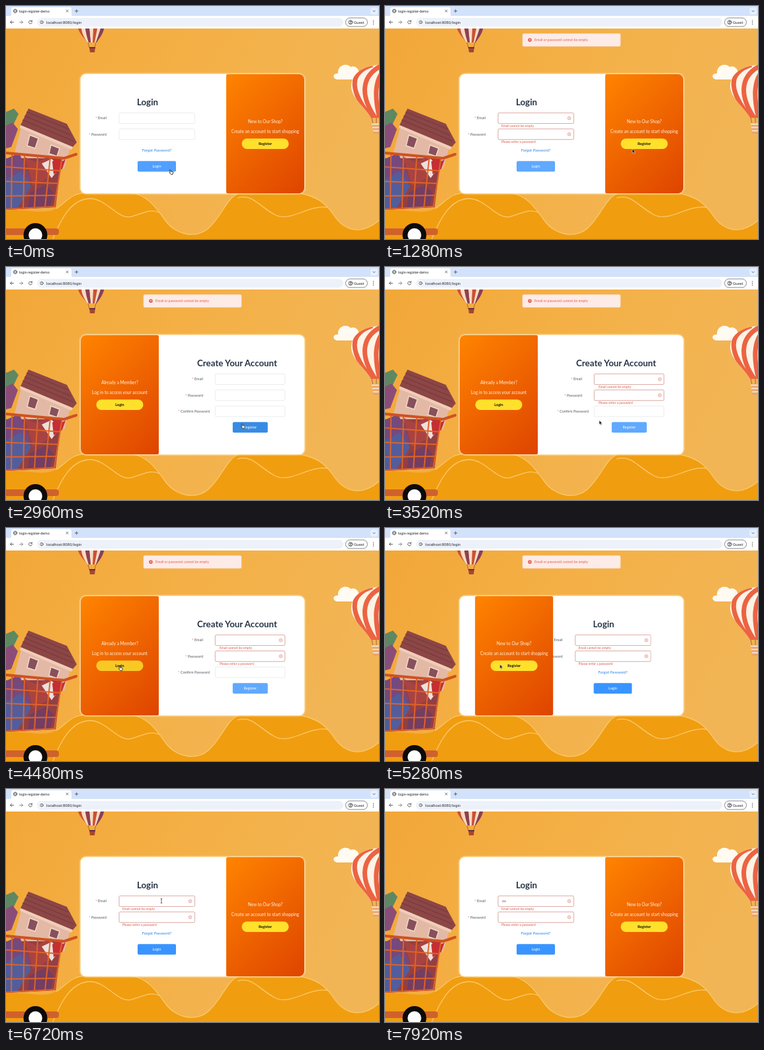
Write an HTML page that moves like this. It is 564x352 px and loops after 8000 ms.

```html
<!DOCTYPE html>
<html lang="en">
<head>
<meta charset="utf-8">
<title>Login register demo</title>
<style>
html, body { margin: 0; height: 100%; overflow: hidden; background: #f4ae43; }
svg { display: block; width: 100vw; height: 100vh; }
text { font-family: Lato, "Open Sans", sans-serif; font-size: 5.5px; fill: #555a63; }
.ui { font-family: Roboto, "Liberation Sans", sans-serif; fill: #2b2d31; }
.title { font-size: 13.3px; font-weight: 700; fill: #263445; text-anchor: middle; }
.mid { text-anchor: middle; }
.end { text-anchor: end; }
.pitch { font-size: 6.55px; fill: #fff3df; text-anchor: middle; }
.err { font-size: 4.9px; fill: #d9604f; }
.star { fill: #e2574c; }
.white { fill: #fff; }
.dark { fill: #111; font-weight: 700; }
.field { fill: #fff; stroke: #e2e4e9; stroke-width: .7; }
.bad { fill: none; stroke: #dc9488; stroke-width: .7; }
.icon { fill: none; stroke: #45484d; stroke-width: .8; stroke-linecap: round; stroke-linejoin: round; }
.hill { fill: #f19d10; }
.ridge { fill: none; stroke: #f9ca6c; stroke-width: 1.3; }

/* One percent of the loop is 80 ms. */
.panel, .login, .register, .cursor, .toast { animation: 8s linear infinite; }
.step { animation: 8s step-end infinite; }
.panel { animation-name: slide; }
.login { animation-name: login; }
.register { animation-name: register; }
.cursor { animation-name: travel; }
.toast1 { animation-name: toast1; }
.toast2 { animation-name: toast2; }
.joinSide { animation-name: joinSide; }
.backSide { animation-name: backSide; }
.loginErr { animation-name: loginErr; }
.regErr { animation-name: regErr; }
.loginBtn { animation-name: loginBtn; }
.regBtn { animation-name: regBtn; }
.joinBtn { animation-name: joinBtn; }
.backBtn { animation-name: backBtn; }
.arrow { animation-name: arrow; }
.hand { animation-name: hand; }
.beam { animation-name: beam; }
.key1 { animation-name: key1; }
.key2 { animation-name: key2; }

@keyframes slide {
  0% { transform: translateX(0); }
  20.75% { transform: translateX(0); animation-timing-function: ease-in-out; }
  30.75% { transform: translateX(-220px); }
  63.75% { transform: translateX(-220px); animation-timing-function: ease-in-out; }
  73.75%, 100% { transform: translateX(0); }
}
@keyframes login {
  0%, 20.74% { transform: none; visibility: visible; }
  20.75%, 63.74% { transform: translateX(133px); visibility: hidden; }
  63.75% { transform: translateX(133px); visibility: visible; animation-timing-function: ease-in-out; }
  73%, 100% { transform: none; visibility: visible; }
}
@keyframes register {
  0%, 20.74% { transform: translateX(-133px); visibility: hidden; }
  20.75% { transform: translateX(-133px); visibility: visible; animation-timing-function: ease-in-out; }
  30.75%, 63.74% { transform: none; visibility: visible; }
  63.75%, 100% { transform: none; visibility: hidden; }
}
@keyframes joinSide { 0%, 63.75%, 100% { opacity: 1; } 20.75% { opacity: 0; } }
@keyframes backSide { 0%, 63.75%, 100% { opacity: 0; } 20.75% { opacity: 1; } }
@keyframes loginErr { 0% { opacity: 0; } 2%, 100% { opacity: 1; } }
@keyframes regErr { 0% { opacity: 0; } 39%, 100% { opacity: 1; } }
@keyframes loginBtn { 0% { fill: #519fff; } 6% { fill: #60a9ff; } 20.75%, 100% { fill: #3994ff; } }
@keyframes regBtn { 0% { fill: #3994ff; } 34% { fill: #60a9ff; } 36% { fill: #388be4; } 38%, 100% { fill: #60a9ff; } }
@keyframes joinBtn { 0%, 20.75%, 100% { fill: #ffe02b; } 17.5% { fill: #fbca22; } }
@keyframes backBtn { 0%, 63.75%, 100% { fill: #ffe02b; } 51% { fill: #f8c925; } }
@keyframes toast1 {
  0%, 1% { opacity: 0; transform: translateY(-19px); animation-timing-function: ease-out; }
  5%, 38.5% { opacity: 1; transform: none; }
  42.25%, 100% { opacity: 0; transform: translateY(-19px); }
}
@keyframes toast2 {
  0%, 38% { opacity: 0; transform: translateY(6px); animation-timing-function: ease-out; }
  43%, 75.75% { opacity: 1; transform: none; }
  79.5%, 100% { opacity: 0; transform: translateY(-19px); }
}
@keyframes travel {
  0%, 5% { transform: translate(247px, 247px); animation-timing-function: ease-in-out; }
  16% { transform: translate(374px, 216px); }
  19%, 27% { transform: translate(374px, 212px); animation-timing-function: ease-in-out; }
  35%, 40% { transform: translate(355.5px, 236.5px); animation-timing-function: ease-in-out; }
  54%, 64.5% { transform: translate(170.5px, 208px); animation-timing-function: ease-in-out; }
  73% { transform: translate(220px, 177px); }
  79%, 100% { transform: translate(235px, 169px); }
}
@keyframes hand { 0%, 17.5%, 34%, 51% { opacity: 1; } 6.5%, 20.75%, 40.5%, 64.5%, 100% { opacity: 0; } }
@keyframes arrow { 0%, 17.5%, 34%, 51%, 76%, 100% { opacity: 0; } 6.5%, 20.75%, 40.5%, 64.5% { opacity: 1; } }
@keyframes beam { 0%, 90%, 100% { opacity: 0; } 76% { opacity: 1; } }
@keyframes key1 { 0% { opacity: 0; } 91%, 100% { opacity: 1; } }
@keyframes key2 { 0% { opacity: 0; } 95%, 100% { opacity: 1; } }
</style>
</head>
<body>
<svg viewBox="0 0 564 352" preserveAspectRatio="none">
  <defs>
    <linearGradient id="sky" x2="1" y2=".3">
      <stop stop-color="#f2a738"/><stop offset=".5" stop-color="#f4b046"/><stop offset="1" stop-color="#f2b555"/>
    </linearGradient>
    <linearGradient id="flame" gradientUnits="userSpaceOnUse" x1="317.5" y1="118.5" x2="466.5" y2="267.5">
      <stop stop-color="#ff8400"/><stop offset="1" stop-color="#de4400"/>
    </linearGradient>
    <filter id="glow" x="-10%" y="-10%" width="120%" height="120%"><feGaussianBlur stdDeviation="1"/></filter>
    <clipPath id="card"><rect x="113" y="103" width="338" height="180" rx="8"/></clipPath>
    <clipPath id="page"><rect y="34" width="564" height="318"/></clipPath>
    <clipPath id="balloon"><path d="M566 89C536 90 521 106 522 123 524 141 544 154 552 169H566Z"/></clipPath>
    <g id="warn">
      <circle r="2.3" fill="none" stroke="#d9695b" stroke-width=".6"/>
      <path d="M-.8-.8 .8 .8M.8-.8-.8 .8" stroke="#d9695b" stroke-width=".6"/>
    </g>
    <g id="toast">
      <rect x="208" y="41.7" width="148" height="19.2" rx="2" fill="#fdebe7" stroke="#f8d7cd" stroke-width=".6"/>
      <circle cx="219" cy="51.2" r="2.8" fill="#e5604f"/>
      <path d="M218 50.2l2 2M220 50.2l-2 2" stroke="#fff" stroke-width=".6"/>
      <text x="226" y="53" style="font-size:5.2px;fill:#e2604f">Email or password cannot be empty</text>
    </g>
  </defs>

  <!-- Scenery -->
  <g clip-path="url(#page)">
    <rect y="34" width="564" height="318" fill="url(#sky)"/>
    <path class="hill" d="M0 309C30 305 55 317 76 306 92 296 98 281 120 281H188C212 282 226 303 241 324 257 346 287 352 306 336 328 316 333 290 352 282H445C469 288 482 296 495 315 511 340 538 348 566 322V354H0Z"/>
    <path class="ridge" d="M76 306C92 296 98 283 120 282M188 282C212 284 226 303 241 324 257 346 287 352 306 336 328 316 333 290 352 283M445 283C469 288 482 296 495 315 511 340 538 348 566 322"/>
    <path class="ridge" d="M70 354C84 318 100 292 126 291S169 324 190 318 218 306 232 312M350 290C372 283 382 302 406 315S456 300 486 304"/>

    <!-- Top balloon -->
    <path d="M109 34H148C147 42 140 50 137 55H123C120 50 111 42 109 34Z" fill="#cb5134"/>
    <path d="M114 34h6c1 9 3 15 5 21h-2c-3-5-8-12-9-21M126 34h6l-1 21h-3M138 34h5c-2 9-5 15-7 21h-2" fill="#f7dcc0"/>
    <path d="M120 34h6l2 21h-3M143 34h5c-1 8-8 16-11 21h-1" fill="#87415a"/>
    <path d="M124 55l2 8M136 55l-2 8" stroke="#8c4a31" stroke-width=".7"/>
    <path d="M126 62h9l-1 8h-7z" fill="#a5472f"/><path d="M126 62h9v2h-9z" fill="#663044"/>

    <!-- Cloud and right balloon -->
    <path d="M500 111C493 109 494 101 502 102 501 90 514 85 521 92 529 89 535 97 533 102 543 104 542 111 536 111Z" fill="#fffaf2"/>
    <g clip-path="url(#balloon)">
      <path d="M520 86h46v85h-46z" fill="#fdf3e6"/>
      <path d="M554 89C516 101 521 130 553 170M566 91C536 107 536 137 559 170M573 95C557 112 557 137 565 170" fill="none" stroke="#ec6342" stroke-width="7"/>
    </g>
    <path d="M553 169l2 9M560 169v9" stroke="#995139" stroke-width=".8"/>
    <path d="M554 177h12v16h-11z" fill="#e9a46c"/>
    <path d="M553 178.500h13M554 183.500h12M555 188.500h11" stroke="#fae4c7" stroke-width="2"/>

    <!-- Loaded cart -->
    <path d="M0 160l12-5 7 8-13 27-6 2z" fill="#5d8862"/>
    <path d="M0 181l10-5 8 10-10 27-8 2z" fill="#8b4d78"/>
    <path d="M24 179l74 32-10 35-78-13z" fill="#e3b9a5"/>
    <path d="M34 155l58 23 15 28-6 7-79-33z" fill="#8c4645"/>
    <path d="M31 160l64 26M28 166l70 29M25 172l77 32" stroke="#733a3e" stroke-width="1.2"/>
    <path d="M22 180l79 33-2 4-78-33z" fill="#f0cdb9"/>
    <path d="M36 195l13 5-5 15-12-4zM68 210l13 5-4 12-12-4z" fill="#86505d" stroke="#f5d9c5" stroke-width="1.4"/>
    <path d="M0 230h84l-9 74-75 4z" fill="#924045"/>
    <path d="M0 231l20-9 17 40-23 44H0z" fill="#75497e"/>
    <path d="M28 228l19 9 17-11 14 26-37 20z" fill="#a94342"/>
    <path d="M54 238l15-7 13 11-13 18z" fill="#eee0dc"/>
    <path d="M70 235l9-7 5 7 6-3-5 14-13 8z" fill="#c52e32"/>
    <path d="M0 262l22-12 16 22-21 34H0z" fill="#535d9b"/>
    <path d="M36 282l24-12 12 12-5 22-34 2z" fill="#743d62"/>
    <path d="M0 222L88 230M0 243l82 6M0 265l79 3M0 287l76-1M0 307l74-4" fill="none" stroke="#de6327" stroke-width="2"/>
    <path d="M85 228L73 304M67 228l-8 76M48 227l-5 78M28 225l-2 80M9 223l-1 83" stroke="#de6327" stroke-width="2"/>
    <path d="M0 222l88 8 18-6" fill="none" stroke="#cf5222" stroke-width="4" stroke-linejoin="round" stroke-linecap="round"/>
    <rect x="-5" y="336" width="85" height="10" rx="4" fill="#cf622c"/>
    <circle cx="44.5" cy="346" r="18" fill="#0d0a0a"/><circle cx="44.5" cy="346" r="10.3" fill="#fff"/>
  </g>

  <!-- Browser bar -->
  <rect width="564" height="16" fill="#d3e2fb"/>
  <path d="M4 16c3 0 4-1 4-4V5q0-3 3-3h85q3 0 3 3v7c0 3 1 4 4 4z" fill="#fff"/>
  <rect y="15" width="564" height="19" fill="#fff"/>
  <g class="icon">
    <circle cx="14" cy="7.6" r="2.7"/><path d="M11.5 7.6h5M14 5c-2 2-2 3 0 5 2-2 2-3 0-5" stroke-width=".5"/>
    <path d="M91 6l3 3M94 6l-3 3M104.500 7.600h4.400M106.700 5.400v4.400"/>
    <path d="M11.500 24.500H6.500l2.300-2.300M6.500 24.500l2.300 2.300"/>
    <path d="M20.500 24.500h5l-2.300-2.300M25.500 24.500l-2.300 2.300" stroke="#777b82"/>
    <path d="M39 23a2.500 2.500 0 1 0 .4 2M39.300 21.600V23.300h-1.700"/>
  </g>
  <rect x="551" y="2.500" width="11" height="10.500" rx="3" fill="#e6effd"/>
  <path class="icon" d="M555 7l1.600 1.600L558.200 7"/>
  <text class="ui" x="20" y="9.600" style="font-size:5.3px">login-register-demo</text>
  <rect x="47" y="18" width="463" height="13" rx="6.500" fill="#edf1fa"/>
  <circle cx="54" cy="24.500" r="4.200" fill="#fff"/>
  <circle class="icon" cx="54" cy="24.500" r="2.400"/><path class="icon" d="M54 24.500v1M54 23.300v.1"/>
  <text class="ui" x="61" y="26.600" style="font-size:5.8px">localhost:8080/login</text>
  <rect x="513.500" y="18" width="33" height="13" rx="6.500" fill="#fff" stroke="#555b65" stroke-width=".7"/>
  <g class="icon"><circle cx="521" cy="24.500" r="3"/><circle cx="521" cy="23.700" r="1"/><path d="M519.200 26.700q1.800-1.500 3.600 0"/></g>
  <text class="ui" x="526" y="26.500" style="font-size:6px">Guest</text>
  <path d="M555.500 21.800v.1M555.500 24.500v.1M555.500 27.200v.1" stroke="#444" stroke-width="1.300" stroke-linecap="round"/>

  <!-- Card -->
  <rect x="112" y="102" width="340" height="182" rx="9" fill="#fff0cc" filter="url(#glow)"/>
  <rect x="113" y="103" width="338" height="180" rx="8" fill="#fff"/>
  <g clip-path="url(#card)">
    <g class="login">
      <text class="title" x="214" y="149.700">Login</text>
      <text class="end" x="152" y="171.300"><tspan class="star">*</tspan> Email</text>
      <text class="end" x="152" y="195.600"><tspan class="star">*</tspan> Password</text>
      <rect class="field" x="171" y="161.500" width="114.500" height="16" rx="1.800"/>
      <rect class="field" x="171" y="185.700" width="114.500" height="16" rx="1.800"/>
      <g class="step loginErr">
        <rect class="bad" x="171" y="161.500" width="114.500" height="16" rx="1.800"/>
        <rect class="bad" x="171" y="185.700" width="114.500" height="16" rx="1.800"/>
        <use href="#warn" x="278.500" y="169.500"/><use href="#warn" x="278.500" y="193.700"/>
        <text class="err" x="176" y="182.800">Email cannot be empty</text>
        <text class="err" x="176" y="207">Please enter a password</text>
      </g>
      <text class="step key1" x="177" y="171.300">a</text>
      <text class="step key2" x="180" y="171.300">a</text>
      <text class="mid" x="228" y="219.800" style="font-size:5.75px;fill:#2f83e6">Forgot Password?</text>
      <rect class="step loginBtn" x="199" y="234.200" width="58" height="16" rx="2"/>
      <text class="mid white" x="228" y="244.200">Login</text>
    </g>
    <g class="register">
      <text class="title" x="349.500" y="149.700">Create Your Account</text>
      <text class="end" x="298" y="171.300"><tspan class="star">*</tspan> Email</text>
      <text class="end" x="298" y="195.600"><tspan class="star">*</tspan> Password</text>
      <text class="end" x="308" y="219.800"><tspan class="star">*</tspan> Confirm Password</text>
      <rect class="field" x="316.300" y="161.500" width="105.500" height="16" rx="1.800"/>
      <rect class="field" x="316.300" y="185.700" width="105.500" height="16" rx="1.800"/>
      <rect class="field" x="316.300" y="210" width="105.500" height="16" rx="1.800"/>
      <g class="step regErr">
        <rect class="bad" x="316.300" y="161.500" width="105.500" height="16" rx="1.800"/>
        <rect class="bad" x="316.300" y="185.700" width="105.500" height="16" rx="1.800"/>
        <use href="#warn" x="415.500" y="169.500"/><use href="#warn" x="415.500" y="193.700"/>
        <text class="err" x="323" y="182.800">Email cannot be empty</text>
        <text class="err" x="323" y="207">Please enter a password</text>
      </g>
      <rect class="step regBtn" x="342.800" y="234.200" width="53" height="16" rx="2"/>
      <text class="mid white" x="369.300" y="244.200">Register</text>
    </g>
    <g class="panel">
      <rect x="333" y="103" width="118" height="180" rx="2" fill="url(#flame)"/>
      <g class="step joinSide">
        <text class="pitch" x="392" y="177">New to Our Shop?</text>
        <text class="pitch" x="392" y="192">Create an account to start shopping</text>
        <rect class="step joinBtn" x="356.500" y="200.300" width="71" height="15.700" rx="7.850"/>
        <text class="mid dark" x="392" y="210.200">Register</text>
      </g>
      <g class="step backSide">
        <text class="pitch" x="392" y="177">Already a Member?</text>
        <text class="pitch" x="392" y="192">Log in to access your account</text>
        <rect class="step backBtn" x="356.500" y="200.300" width="71" height="15.700" rx="7.850"/>
        <text class="mid dark" x="392" y="210.200">Login</text>
      </g>
    </g>
  </g>

  <g class="toast toast1"><use href="#toast"/></g>
  <g class="toast toast2"><use href="#toast"/></g>

  <g class="cursor">
    <path class="step arrow" d="M0 0V6.300L1.500 5 2.600 7.300 3.700 6.800 2.700 4.600H4.600Z" fill="#111" stroke="#fff" stroke-width=".5"/>
    <path class="step hand" d="M.6.6Q1.400 0 1.900 1L2.600 3 5 3.400Q6 3.700 5.700 5L5 7.300H2.300L0 4.800Q.2 3.900 1.300 4.400Z" fill="#fff" stroke="#111" stroke-width=".8"/>
    <path class="step beam" d="M-1.200-3.500Q0-3.500 0-2.500V2.500Q0 3.500 1.200 3.500M1.200-3.500Q0-3.500 0-2.500M0 2.500Q0 3.500-1.200 3.500" fill="none" stroke="#222" stroke-width=".7"/>
  </g>
</svg>
</body>
</html>
```
